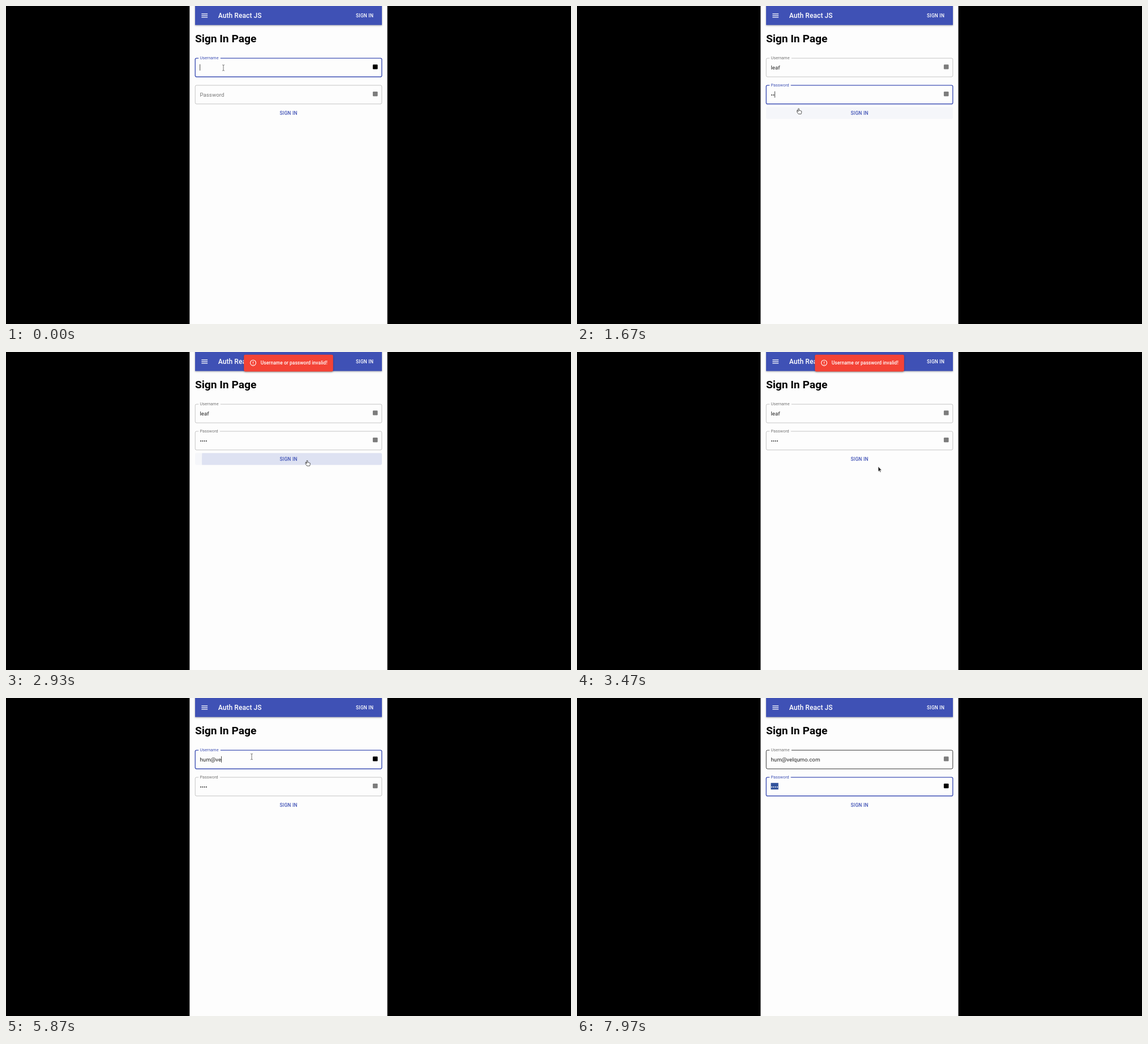
An HTML page for the animation above (8000 ms loop, 998x561 px).

```html
<!DOCTYPE html>
<html lang="en">
<head>
<meta charset="utf-8">
<title>Sign in form</title>
<style>
  html, body { margin: 0; width: 100%; height: 100%; overflow: hidden; background: #000; }
  svg { display: block; width: 100vw; height: 100vh; font-family: Roboto, Arial, sans-serif; }
  text { white-space: pre; }
  .value { font-size: 9.6px; letter-spacing: .09px; }
  .button { font-size: 8.4px; font-weight: 500; letter-spacing: .24px; }
  .bar { filter: drop-shadow(0 1.4px 1.4px rgba(0, 0, 0, .32)); }
</style>
</head>
<body>
<svg id="stage" viewBox="0 0 998 561" xmlns="http://www.w3.org/2000/svg">
  <defs><clipPath id="buttonClip"><rect x="334" y="178.2" width="330" height="21" rx="2.4"/></clipPath></defs>
  <rect width="998" height="561" fill="#000"/>
  <rect x="324.3" width="349.3" height="561" fill="#fdfdfd"/>

  <rect class="bar" x="334" y="-4" width="330" height="37.6" fill="#3f51b5"/>
  <path d="M345.3 13.8h10.8m-10.8 3h10.8m-10.8 3h10.8" stroke="#fff" stroke-width="1.2"/>
  <text x="374.7" y="21" font-size="12" font-weight="500" letter-spacing=".09" fill="#fff">Auth React JS</text>
  <text class="button" x="618" y="19.8" fill="#fff">SIGN IN</text>
  <text x="333.9" y="64.4" font-size="19.2" font-weight="700" fill="#000">Sign In Page</text>

  <g id="fields"></g>

  <g clip-path="url(#buttonClip)" fill="#3f51b5">
    <rect id="hover" x="334" y="178" width="330" height="22" opacity=".04"/>
    <circle id="ripple" cx="532" cy="191"/>
  </g>
  <text class="button" x="499.1" y="191.7" text-anchor="middle" fill="#3f51b5">SIGN IN</text>

  <g id="toast">
    <rect class="bar" x="420.2" y="4.8" width="157.6" height="29.6" rx="2.4" fill="#f44336"/>
    <circle cx="436.5" cy="19.2" r="4.9" fill="none" stroke="#fff" stroke-width="1.1"/>
    <path d="M436.5 16.4v3.4m0 1.1v1.2" stroke="#fff" stroke-width="1.1"/>
    <text x="449.8" y="22.2" font-size="8.4" font-weight="500" letter-spacing=".09" fill="#fff">Username or password invalid!</text>
  </g>

  <g id="pointer">
    <path id="beam" fill="none" stroke="#555" stroke-width=".8"
      d="M-1.9-5.2Q0-5.2 0-4Q0-5.2 1.9-5.2M0-4V4M-1.9 5.2Q0 5.2 0 4Q0 5.2 1.9 5.2"/>
    <path id="hand" fill="#fff" stroke="#333" stroke-width=".8" stroke-linejoin="round"
      d="M-.9.8Q0-.4.9.8V4L2.4 3.9L3.7 4.4L5.2 5V7.6L4.4 10H-.4L-2.9 6.5Q-3-.2 -.9 6Z"/>
    <path id="arrow" fill="#222" stroke="#fff" stroke-width=".6" d="M0 0V9.2L2.1 7.3L3.5 10.3L4.9 9.7L3.5 6.7H6.3Z"/>
  </g>
</svg>
<script>
  const LOOP = 8000, BLUE = "#3f51b5", LEFT = 342.4;
  const NAME = "leaf", MAIL = "hum@velqumo.com", MAIL_AT = 5200, KEY_GAP = 116;
  const nameKeys = [250, 360, 470, 580];
  const passKeys = [1400, 1560, 1700, 1850];
  const PASS_TAB = 1000, PRESS = 2555, RELEASE = 2720, TOAST_IN = 2640, TOAST_OUT = 4700;
  const NAME_CLICK = 4130, NAME_SELECT = 4230, LAST_TAB = 7250;

  // time, x, y of the pointer's hot spot
  const route = [
    [0, 384, 109], [1380, 384, 109], [1670, 391.5, 180.5], [2400, 532, 192], [2930, 532, 191],
    [3330, 532, 202], [3500, 532, 202], [4100, 438, 106], [4300, 438, 106], [4900, 434, 103.5], [LOOP, 434, 103.5]
  ];

  const $ = id => document.getElementById(id);
  const clamp = v => Math.max(0, Math.min(1, v));
  const set = (node, attrs) => { for (const k in attrs) node.setAttribute(k, attrs[k]); };
  const show = (node, on) => set(node, { visibility: on ? "visible" : "hidden" });

  function add(parent, tag, attrs) {
    const node = document.createElementNS("http://www.w3.org/2000/svg", tag);
    set(node, attrs);
    return parent.appendChild(node);
  }

  // cubic-bezier timing curve
  function bezier(x1, y1, x2, y2) {
    const at = (a, b, s) => 3 * a * s * (1 - s) ** 2 + 3 * b * s * s * (1 - s) + s ** 3;
    return v => {
      let lo = 0, hi = 1;
      for (let i = 0; i < 24; i++) {
        const mid = (lo + hi) / 2;
        if (at(x1, x2, mid) < v) lo = mid; else hi = mid;
      }
      return at(y1, y2, lo);
    };
  }
  const standard = bezier(.4, 0, .2, 1), easeOut = bezier(0, 0, .2, 1);
  const progress = (t, start, length, ease = standard) => {
    const v = clamp((t - start) / length);
    return v === 0 || v === 1 ? v : ease(v);
  };

  function makeField(top, label, notchWidth) {
    const g = $("fields");
    const box = add(g, "rect", { x: 334.2, y: top + .4, width: 329.6, height: 32.9, rx: 2.4, fill: "none" });
    const notch = add(g, "rect", { x: 340.2, y: top - 1.5, height: 4, fill: "#fdfdfd" });
    const title = add(g, "text", { class: "value" });
    title.textContent = label;
    const mark = add(g, "rect", { x: LEFT, y: top + 10.3, height: 11.6, fill: "#32539c" });
    const value = add(g, "text", { class: "value", x: LEFT, y: top + 20 });
    const caret = add(g, "rect", { y: top + 11, width: .8, height: 11.2, fill: "#222" });
    const icon = add(g, "rect", { x: 647.9, y: top + 11.5, width: 8.6, height: 8.3, rx: 1.3 });

    return s => {
      set(box, {
        stroke: s.focus ? BLUE : s.hover ? "#212121" : "rgba(0,0,0,.25)",
        "stroke-width": s.focus ? 1.4 : .9
      });
      set(notch, { width: notchWidth * s.shrink });
      set(title, {
        fill: s.focus ? BLUE : "rgba(0,0,0,.54)",
        transform: `translate(${LEFT} ${top + 20 - 17.5 * s.shrink}) scale(${1 - .25 * s.shrink})`
      });
      value.textContent = s.text;
      set(value, { fill: s.selected ? "#fff" : "#212121" });
      const width = s.text ? value.getComputedTextLength() : 0;
      set(mark, { width: s.selected ? width : 0 });
      set(caret, { x: LEFT + width - .1 });
      show(caret, s.focus && !s.selected && s.blink);
      set(icon, { fill: s.darkIcon ? "#000" : "#7c7c7c" });
    };
  }
  const drawName = makeField(91.7, "Username", 38.6);
  const drawPass = makeField(139.5, "Password", 37.4);

  const typed = (keys, t) => keys.filter(k => k <= t).length;
  const mailKeys = [...MAIL].map((_, i) => MAIL_AT + i * KEY_GAP);
  const caretResets = [0, ...nameKeys, PASS_TAB, ...passKeys, NAME_CLICK, ...mailKeys];

  function pointerAt(t) {
    const i = route.findIndex((p, n) => n && t <= p[0]);
    const [t0, x0, y0] = route[i - 1], [t1, x1, y1] = route[i];
    const v = (t - t0) / (t1 - t0), e = v * v * (3 - 2 * v);
    return { x: x0 + (x1 - x0) * e, y: y0 + (y1 - y0) * e };
  }

  function draw(t) {
    const p = pointerAt(t);
    const within = (a, b) => p.y >= a && p.y <= b;
    const overName = within(91.7, 125.3), overPass = within(139.5, 173.1), overButton = within(178.2, 199.2);
    const blink = (t - Math.max(...caretResets.filter(k => k <= t))) % 1000 < 500;

    const nameFocus = t < PASS_TAB || (t >= NAME_CLICK && t < LAST_TAB);
    drawName({
      focus: nameFocus, hover: overName, shrink: 1, blink,
      text: t < MAIL_AT ? NAME.slice(0, typed(nameKeys, t)) : MAIL.slice(0, typed(mailKeys, t)),
      selected: t >= NAME_SELECT && t < MAIL_AT,
      darkIcon: nameFocus
    });
    drawPass({
      focus: (t >= PASS_TAB && t < PRESS) || t >= LAST_TAB, hover: overPass, blink,
      shrink: progress(t, PASS_TAB, 200, easeOut),
      text: "•".repeat(typed(passKeys, t)),
      selected: t >= LAST_TAB, darkIcon: t >= LAST_TAB
    });

    show($("hover"), overButton);
    set($("ripple"), {
      r: 200 * progress(t, PRESS, 550),
      opacity: (.1 + .2 * progress(t, PRESS, 550)) * (1 - progress(t, RELEASE, 550))
    });

    const shown = progress(t, TOAST_IN, 225) - progress(t, TOAST_OUT, 195);
    const scale = .75 + .25 * shown;
    set($("toast"), {
      opacity: shown,
      transform: `translate(499 19.6) scale(${scale} ${scale * scale}) translate(-499 -19.6)`
    });

    const visible = t < nameKeys[0] || (t >= 1380 && t < 5950);
    const overText = overName || overPass;
    set($("pointer"), { transform: `translate(${p.x} ${p.y})` });
    show($("beam"), visible && overText);
    show($("hand"), visible && overButton);
    show($("arrow"), visible && !overText && !overButton);
  }

  const start = performance.now();
  function tick() {
    draw((performance.now() - start) % LOOP);
    requestAnimationFrame(tick);
  }
  tick();
</script>
</body>
</html>
```
